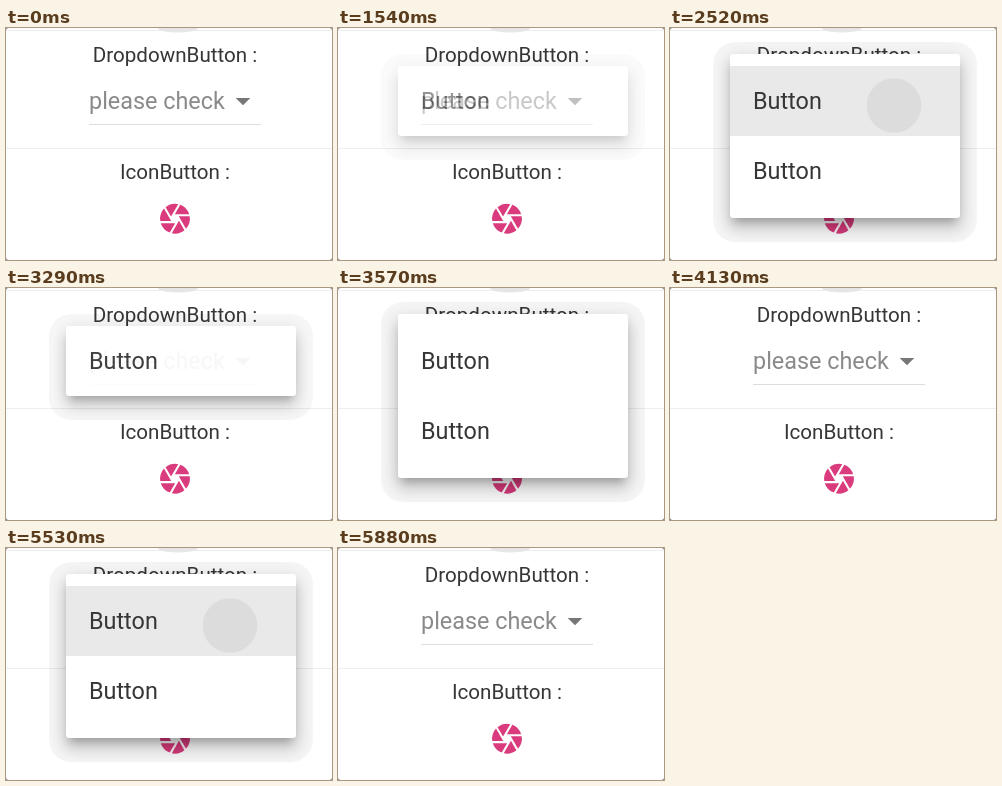
An HTML page that plays this animation: 326x232 px, repeating every 6.3 s.

```html
<!DOCTYPE html>
<html lang="en">
<head>
<meta charset="utf-8">
<title>Dropdown menu</title>
<style>
  html, body { margin: 0; width: 100%; height: 100%; overflow: hidden; background: #888; }
  #stage { position: relative; width: 326px; height: 232px; overflow: hidden; background: #fff; border-radius: 3px; }
  svg { position: absolute; left: 0; top: 0; }
  text { font-family: Roboto, sans-serif; font-size: 23.4px; fill: #363636; }
  .title { font-size: 20.6px; text-anchor: middle; }
  #menu { position: absolute; left: 60px; width: 230px; }
  #halo { position: absolute; inset: -12px -17px -24px; border-radius: 22px; background: rgba(0, 0, 0, .04); }
  #sheet {
    position: absolute; inset: 0; overflow: hidden; border-radius: 3px; background: #fff;
    box-shadow: 0 7px 8px -4px rgba(0, 0, 0, .2), 0 11px 16px 1px rgba(0, 0, 0, .14), 0 4px 16px 2px rgba(0, 0, 0, .1);
  }
  #items { left: -60px; }
</style>
</head>
<body>
<div id="stage">
  <svg width="326" height="232">
    <path d="M0 2.5H326M0 120.5H326" stroke="#eee"/>
    <ellipse cx="172" rx="20" ry="4.5" fill="#e6e6e6"/>
    <text class="title" x="169" y="34">DropdownButton :</text>
    <text x="83" y="81" style="fill:#8a8a8a">please check</text>
    <path d="M229.7 70h14.6l-7.3 7.3z" fill="#777"/>
    <path d="M83 96.5H255" stroke="#ddd"/>
    <text class="title" x="169" y="151">IconButton :</text>
    <g id="shutter" transform="translate(169 190.7) scale(1.49)" fill="#d93b7d"></g>
  </svg>
  <div id="menu">
    <div id="halo"></div>
    <div id="sheet">
      <svg id="items" width="326" height="232">
        <clipPath id="row"><rect x="60" y="38" width="230" height="70"/></clipPath>
        <g clip-path="url(#row)">
          <rect id="highlight" x="60" y="38" width="230" height="70" fill="#bcbcbc"/>
          <circle id="splash" cx="224" cy="77.5" fill="#c8c8c8" fill-opacity=".4"/>
        </g>
        <text x="83" y="81">Button</text>
        <text id="second" x="83" y="151">Button</text>
      </svg>
    </div>
  </div>
</div>
<script>
  const LOOP = 6300, STEP = 70;
  const FADE = 87.5;         // menu fade, then resize, each take this long
  const POP_DELAY = 280;     // from tap to dismissal
  const visits = [
    { open: 1493, tap: 2333 },
    { open: 3208, tap: 3733 },
    { open: 4828, tap: 5343 },
  ];
  const $ = id => document.getElementById(id);
  const progress = (t, start, length) => Math.min(1, Math.max(0, (t - start) / length));
  const mix = (a, b, p) => a + (b - a) * p;

  for (let angle = 0; angle < 360; angle += 60) {
    $('shutter').innerHTML +=
      `<path d="M9.54-3A10 10 0 0 0 3.54-9.34L-.12-3z" transform="rotate(${angle})"/>`;
  }

  function draw(t) {
    const visit = visits.find(v => t >= v.open && t < v.tap + POP_DELAY + FADE);
    $('menu').style.display = visit ? 'block' : 'none';
    if (!visit) return;

    const { open, tap } = visit;
    const size = progress(t, open + FADE, FADE);
    const top = mix(38, 26, size);
    $('menu').style.opacity = progress(t, open, FADE) * (1 - progress(t, tap + POP_DELAY, FADE));
    $('menu').style.top = top + 'px';
    $('menu').style.height = mix(108, 190, size) - top + 'px';
    $('items').style.top = -top + 'px';
    $('second').setAttribute('opacity', progress(t, open + 275, 75));
    $('highlight').setAttribute('opacity', .4 * progress(t, tap, 233));
    $('splash').setAttribute('r', 170 * progress(t, tap, 1167));
  }

  const start = performance.now();
  function tick() {
    const t = (performance.now() - start) % LOOP;
    draw(Math.floor(t / STEP) * STEP);
    requestAnimationFrame(tick);
  }
  tick();
</script>
</body>
</html>
```
